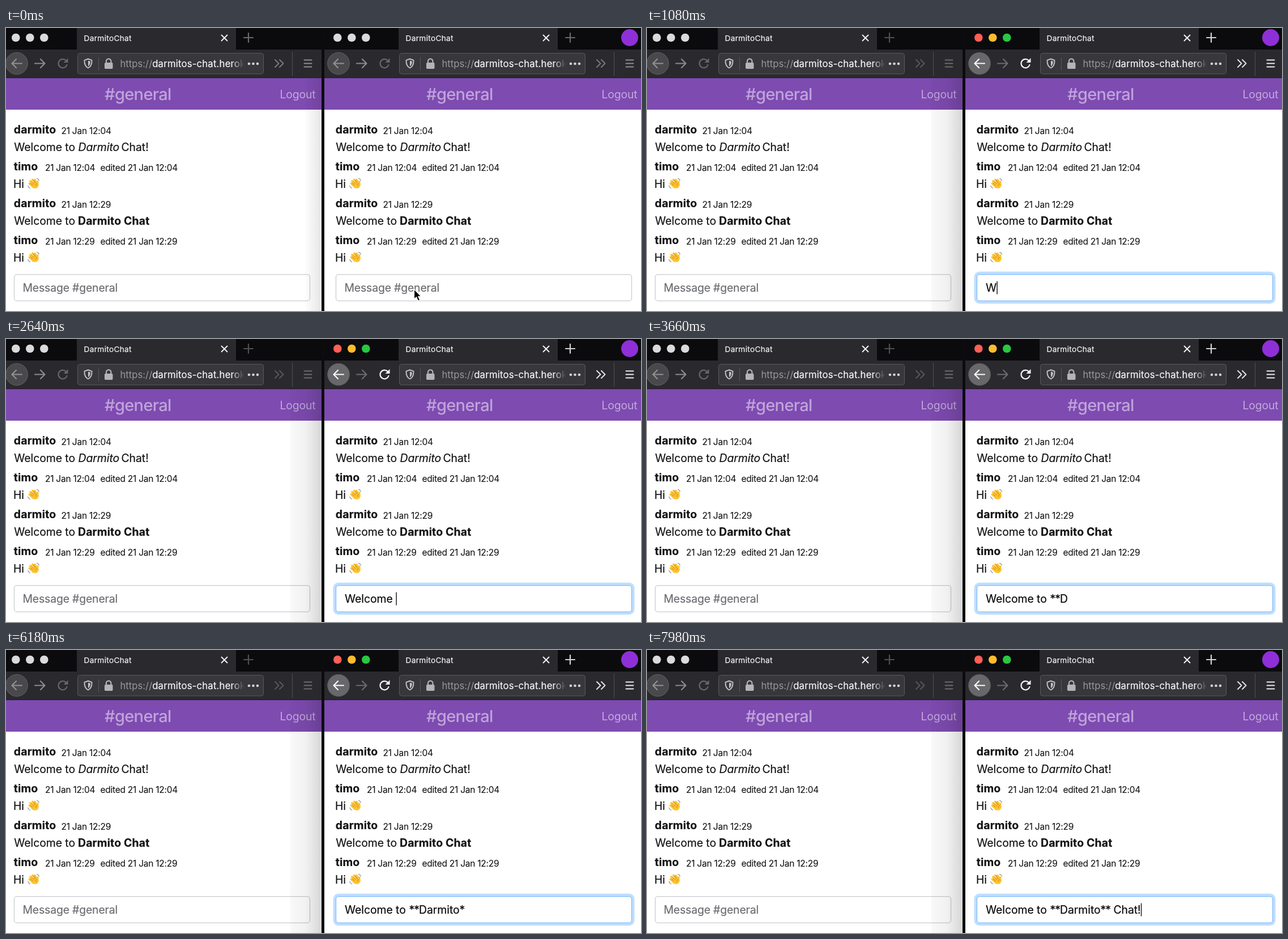
Recreate the animation shown at these times as an HTML page. Size 1121x499 px, loop 8000 ms.

```html
<!DOCTYPE html>
<html lang="en">
<head>
<meta charset="utf-8">
<title>Chat</title>
<style>
html, body { margin: 0; width: 100%; height: 100%; overflow: hidden; background: #0b0b0d; }
svg { display: block; width: 1121px; height: 499px; }
text {
  font: 400 19.4px Inter, "Open Sans", sans-serif;
  font-optical-sizing: none;
  letter-spacing: -.003em;
  white-space: pre;
  fill: #141416;
  stroke: #141416;
  stroke-width: .22px;
}
.b { font-weight: 700; letter-spacing: .009em; }
.i { font-style: italic; }
.date { font-size: 15.5px; letter-spacing: -.016em; stroke-width: .1px; }
.title { font-size: 13.7px; letter-spacing: .022em; fill: #f2f2f4; stroke: #f2f2f4; }
.url { font-size: 16.7px; letter-spacing: 0; fill: #98989c; stroke: none; }
.url .host { fill: #f6f6f8; stroke: #f6f6f8; letter-spacing: .012em; }
.room { font-size: 29.1px; font-weight: 500; letter-spacing: -.024em; fill: #bfa3da; stroke: none; }
.logout { fill: #c2aadc; stroke: none; letter-spacing: -.008em; }
.hint { fill: #6b6d72; stroke: #6b6d72; letter-spacing: -.008em; }
.piece { fill: #0a0a0b; stroke: #0a0a0b; }
.star { letter-spacing: -.05em; }
.line { fill: none; stroke-width: 2; stroke-linecap: round; stroke-linejoin: round; }

.win { --back: #929294; --fwd: #8c8c8f; --reload: #66666a; --plus: #6a6a6d; --more: #7a7a7d; --menu: #909093; --disc: #49494b; }
.on .left { --plus: #505053; --more: #58585b; --menu: #6d6d70; }
.on .right { --back: #fafafa; --fwd: #6c6c70; --reload: #f2f2f4; --plus: #d2d2d4; --more: #e2e2e4; --menu: #ececee; --disc: #68686b; }
.light { fill: #dadadb; }
.on .right .light:nth-of-type(1) { fill: #ff5f57; }
.on .right .light:nth-of-type(2) { fill: #fdbc2e; }
.on .right .light:nth-of-type(3) { fill: #28c840; }
.on #soft, svg:not(.on) #deep { display: none; }
</style>
</head>
<body>
<svg id="stage" viewBox="0 0 1121 499">
  <defs>
    <linearGradient id="g1">
      <stop offset="0" stop-opacity="0"/><stop offset="1" stop-opacity=".1"/>
    </linearGradient>
    <linearGradient id="g2">
      <stop offset="0" stop-opacity=".025"/><stop offset=".5" stop-opacity=".055"/><stop offset="1" stop-opacity=".16"/>
    </linearGradient>
    <linearGradient id="fade">
      <stop offset="0" stop-color="#38383c" stop-opacity="0"/><stop offset="1" stop-color="#38383c"/>
    </linearGradient>
    <g id="wave" fill="none" stroke-linecap="round">
      <g stroke="#fdc22f">
        <path d="M5 6.5 11 13M8.6 4 14 11M12.4 4.4 16 10M3.6 10.4 9 15" stroke-width="3.3"/>
        <path d="M17.2 7.5Q16.6 10 17.6 13" stroke-width="3.2"/>
        <path d="M11.2 13.4 13.6 13.6" stroke-width="9.6"/>
      </g>
      <path d="M6.8 6.3 11 11.2M10.4 4.9 13.7 9.6M5.2 9.9 9 13.2M16 10.4Q13.6 11.6 14 14" stroke="#c47d14" stroke-width=".9"/>
      <path d="M16 2.2Q18.6 2.8 19.4 5.4M1.2 14.2Q2 17 4.6 18.2" stroke="#7f9aa9" stroke-width="1.2"/>
    </g>
    <path id="bar" d="M716 452.5q4 0 4 3.5v10.5q0 3.5-4 3.5M724 452.5q-4 0-4 3.5M720 466.5q0 3.5 4 3.5M718 462h4"/>
  </defs>
  <g id="windows"></g>
  <path id="arrow" d="M720.5 460.5V478l4-3.6 3 6.6 3.2-1.4-3-6.3h5.2Z" fill="#000" stroke="#fff" stroke-width="1.2"/>
  <g id="beam" fill="none" stroke-linecap="round">
    <use href="#bar" stroke="#fff" stroke-width="3.4"/>
    <use href="#bar" stroke="#111" stroke-width="1.5"/>
  </g>
</svg>
<script>
const LOOP = 8000, FOCUS = 60, RING_MS = 85;
const $ = id => document.getElementById(id);
const stage = $('stage');

const text = (x, y, s, cls = '') => `<text x="${x}" y="${y}" class="${cls}">${s}</text>`;
const line = (d, color, w = 2) => `<path class="line" d="${d}" style="stroke:${color};stroke-width:${w}"/>`;

function header(y, name, time, edited) {
  const x = name === 'timo' ? 69 : 97.5;
  return text(13.8, y - .5, name, 'b') + text(x, y, '21 Jan ' + time, 'date') +
    (edited ? text(166.5, y, 'edited 21 Jan ' + time, 'date') : '');
}

function greeting(y, time, body) {
  return header(y, 'darmito', time) + text(14.2, y + 30, 'Welcome to') + body(y + 30) +
    header(y + 65, 'timo', time, true) + text(13, y + 95, 'Hi') +
    `<use href="#wave" transform="translate(37.5 ${y + 76.5}) scale(1.07)"/>`;
}

const messages = greeting(186.5, '12:04', y => text(127.5, y, 'Darmito', 'i') + text(203.5, y, 'Chat!')) +
  greeting(316.5, '12:29', y => text(127, y, 'Darmito Chat', 'b'));

const toolbar = `
  <rect x="-6" width="563" height="38" fill="#0b0b0e"/>
  <rect x="125" width="281" height="38" fill="#2a2a2e"/>
  <rect x="-6" y="38" width="563" height="50" fill="#2a2a2e"/>
  <g>${[17.3, 42.3, 67.3].map(x => `<circle class="light" cx="${x}" cy="17" r="7.3"/>`).join('')}</g>
  ${text(137.5, 23, 'DarmitoChat', 'title')}
  ${line('M380.5 12.5l10 10m0-10l-10 10', '#f4f4f5', 1.9)}
  ${line('M420 17h16M428 9v16', 'var(--plus)', 2.2)}
  <circle cx="19" cy="62.5" r="19.3" style="fill:var(--disc)" stroke="#626265"/>
  ${line('M28 62.5H10.5M18 55l-7.5 7.5 7.5 7.5', 'var(--back)', 2.2)}
  ${line('M51 62.5H68.5M61 55l7.5 7.5-7.5 7.5', 'var(--fwd)', 2.2)}
  ${line('M106 57.5A7.7 7.7 0 1 0 107.5 65', 'var(--reload)', 2.2)}
  <path d="M109.5 53v8h-8Z" style="fill:var(--reload)"/>
  <rect x="126.5" y="44.5" width="328" height="36.5" rx="4" fill="#38383c" stroke="#5a5a5d"/>
  ${line('M145 54.5l6.5 2.3q.5 10.2-6.5 13.7q-7-3.5-6.5-13.7Z', '#c4c4c6', 1.9)}
  <path d="M145 57.5l3.8 1.3q.2 6-3.8 8.7Z" fill="#c4c4c6"/>
  ${line('M163.5 52v22', '#58585b', 1)}
  <rect x="174" y="61" width="14.5" height="11" rx="1.8" fill="#b4b4b7"/>
  ${line('M177 61v-2.5a4.2 4.2 0 0 1 8.4 0V61', '#b4b4b7', 2.2)}
  ${text(201.5, 69, 'https://<tspan class="host">darmitos-chat.herok</tspan>', 'url')}
  <rect x="398" y="47" width="22" height="31" fill="url(#fade)"/>
  <rect x="420" y="47" width="33" height="31" fill="#38383c"/>
  ${[429, 436.5, 444].map(x => `<circle cx="${x}" cy="63" r="2.3" fill="#d2d2d4"/>`).join('')}
  ${line('M475 56l6.5 6.5-6.5 6.5M483 56l6.5 6.5-6.5 6.5', 'var(--more)')}
  ${line('M505.5 42v42', '#505054', 1)}
  ${line('M526.5 56.5h13M526.5 62.5h13M526.5 68.5h13', 'var(--menu)')}
  <rect x="-6" y="87" width="563" height="1.3" fill="#1d1726"/>`;

const page = `
  <rect x="-6" y="88" width="563" height="411" fill="#fff"/>
  <rect x="-6" y="88" width="563" height="56" fill="#7e4bb1"/>
  ${text(174, 127, '#general', 'room')}
  ${text(483.5, 124, 'Logout', 'logout')}
  ${messages}`;

const field = id => `<rect id="${id}" x="14.5" y="434.5" width="522" height="46.5" rx="4.5" fill="#fff" stroke="#c9cbce" stroke-width="1.25"/>`;
const hint = id => `<g id="${id}">${text(29.5, 465, 'Message #general', 'hint')}</g>`;

// Input pieces: first character, x, class
const PIECES = [[0, 30, ''], [11, 143.5, 'star'], [13, 161, ''], [20, 232.5, 'star'], [22, 250, '']];

$('windows').innerHTML = `
  <g class="win left">${page}${field('idle')}${hint('idleHint')}${toolbar}
    <rect id="soft" x="526" y="89" width="31" height="410" fill="url(#g1)"/>
    <rect id="deep" x="502" y="89" width="55" height="410" fill="url(#g2)"/>
  </g>
  <rect x="557" width="5" height="499" fill="#0c0c0e"/>
  <g class="win right" transform="translate(568)">
    ${page}
    <rect id="ring" fill="#bfdeff"/>${field('box')}${hint('boxHint')}
    ${PIECES.map(([, x, cls]) => text(x, 465, '', 'piece ' + cls)).join('')}
    <rect id="caret" y="446.5" width="1.4" height="23" fill="#111"/>
    ${toolbar}
    <circle cx="533" cy="17" r="15" fill="#8f2fd8"/>
  </g>`;

// Key presses in order; "<" deletes
const KEYS = 'Welcome to **Dari<mito** Chat!';
const TIMES = [900, 1320, 1680, 1920, 2100, 2280, 2400, 2640, 2760, 2880, 3000, 3180, 3480, 3660,
  3960, 4320, 4560, 5040, 5160, 5400, 5520, 5640, 5880, 6660, 6900, 7080, 7200, 7320, 7500, 7680];
const CARET_OFF = [[0, FOCUS], [540, 900], [3660, 3780], [6120, 6420]];

const pieces = [...document.querySelectorAll('.piece')];
const show = (id, on) => $(id).setAttribute('visibility', on ? 'visible' : 'hidden');
const mix = (a, b, k) => `rgb(${a.map((v, i) => Math.round(v + (b[i] - v) * k))})`;

function typed(t) {
  let s = '';
  TIMES.forEach((at, i) => {
    if (t >= at) s = KEYS[i] === '<' ? s.slice(0, -1) : s + KEYS[i];
  });
  return s;
}

function drawInput(s) {
  let end = 30;
  PIECES.forEach(([from, x], i) => {
    const part = s.slice(from, PIECES[i + 1]?.[0]);
    if (pieces[i].textContent !== part) pieces[i].textContent = part;
    if (part) end = x + pieces[i].getComputedTextLength();
  });
  $('caret').setAttribute('x', end + .3);
  show('boxHint', !s);
}

function render(t) {
  stage.classList.toggle('on', t >= FOCUS);
  const k = Math.min(1, Math.max(0, (t - FOCUS) / RING_MS));
  const r = 5 * k;
  Object.entries({ x: 14.5 - r, y: 434.5 - r, width: 522 + 2 * r, height: 46.5 + 2 * r, rx: 4.5 + r })
    .forEach(([name, v]) => $('ring').setAttribute(name, v));
  $('box').setAttribute('stroke', mix([201, 203, 206], [128, 189, 255], k));
  drawInput(typed(t));
  show('caret', !CARET_OFF.some(([a, b]) => t >= a && t < b));
  show('arrow', t < FOCUS);
  show('beam', t >= FOCUS && t < TIMES[0]);
}

const start = performance.now();
function tick() {
  render((performance.now() - start) % LOOP);
  requestAnimationFrame(tick);
}
render(0);
tick();
</script>
</body>
</html>
```
